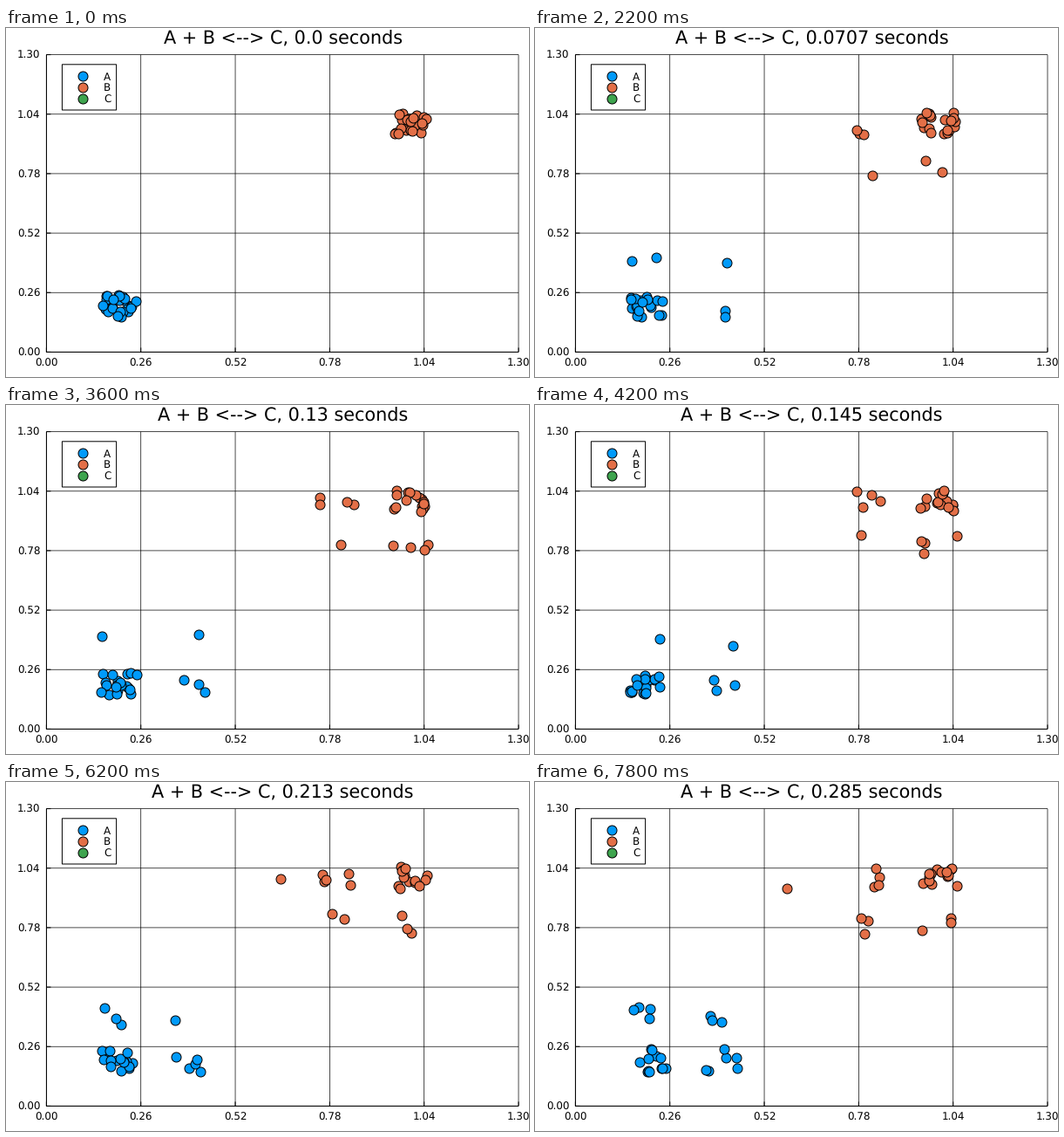
A matplotlib script that plays this animation: 600 px wide and 400 px high, repeating every 8000 ms.

```python
import numpy as np
import matplotlib
import matplotlib.pyplot as plt
from matplotlib.animation import FuncAnimation
from matplotlib.patches import Rectangle

matplotlib.rcParams.update({"toolbar": "None", "text.hinting": "none"})

W, H, DPI = 600, 400, 100
FRAMES, STEP_MS = 40, 200
COUNT = 25
LEFT, RIGHT, TOP, BOTTOM = 46.4, 588.0, 30.6, 371.4
LIMIT, TICK = 1.3, 0.26
CELL = 0.2      # lattice pitch of the diffusion grid
SPREAD = 0.05   # molecules are scattered this far around a cell centre
BLUE, ORANGE, GREEN = "#009afa", "#e36f47", "#3ea44e"

# Simulated time, and molecules that have reached each cell, at a few steps.
STEPS = [0, 7, 14, 18, 25, 31, 39]
SECONDS = [0.0, 0.0456, 0.0895, 0.13, 0.165, 0.213, 0.285]
A_HOME, A_REACHED = (1, 1), {
    (1, 2): [0, 1, 2, 1, 2, 3, 4],
    (2, 1): [0, 2, 2, 3, 4, 5, 6],
    (2, 2): [0, 0, 1, 1, 1, 1, 3],
}
B_HOME, B_REACHED = (5, 5), {
    (4, 5): [0, 1, 4, 4, 5, 5, 4],
    (4, 4): [0, 1, 1, 1, 1, 2, 3],
    (5, 4): [0, 1, 2, 4, 4, 3, 3],
    (3, 5): [0, 0, 0, 0, 0, 1, 1],
}


def to_px(x, y):
    return (LEFT + x * (RIGHT - LEFT) / LIMIT,
            BOTTOM - y * (BOTTOM - TOP) / LIMIT)


def scatter(step, home, reached, seed):
    """Every molecule is placed anew at random within its cell."""
    rng = np.random.default_rng([seed, step])
    cells = []
    for cell, counts in reached.items():
        cells += [cell] * round(np.interp(step, STEPS, counts))
    cells += [home] * (COUNT - len(cells))
    xy = np.array(cells) * CELL + rng.uniform(-SPREAD, SPREAD, (COUNT, 2))
    return to_px(*rng.permutation(xy).T)


def label(x, y, text, size=11.9, **kw):
    return ax.text(x, y, text, fontsize=size * 72 / DPI, family="DejaVu Sans",
                   color="black", va="baseline", zorder=3, **kw)


def rule(xs, ys, width):
    ax.plot(xs, ys, color="black", lw=width * 72 / DPI, snap=False,
            solid_capstyle="butt", zorder=1)


def dots(color, xs=(), ys=()):
    line, = ax.plot(xs, ys, "o", ms=11 * 72 / DPI, mew=72 / DPI, mfc=color,
                    mec="black", snap=False, zorder=3)
    return line


fig = plt.figure(figsize=(W / DPI, H / DPI), dpi=DPI, facecolor="white")
ax = fig.add_axes([0, 0, 1, 1])
ax.set_xlim(0, W)
ax.set_ylim(H, 0)
ax.axis("off")

for k in range(6):
    x, y = to_px(k * TICK, k * TICK)
    text = f"{k * TICK:.2f}"
    rule([x, x], [TOP, BOTTOM], 0.7)
    rule([LEFT, RIGHT], [y, y], 0.7)
    rule([x, x], [BOTTOM - 5, BOTTOM], 1)
    rule([LEFT, LEFT + 5], [y, y], 1)
    label(x, 388, text, ha="center")
    label(39.5, y + 4.6, text, ha="right")
rule([LEFT, LEFT, RIGHT], [TOP, BOTTOM, BOTTOM], 1)

ax.add_patch(Rectangle((64.4, 41.8), 62.2, 52.2, fc="white", ec="black",
                       lw=72 / DPI, snap=False, zorder=2))
for i, (name, color) in enumerate(zip("ABC", (BLUE, ORANGE, GREEN))):
    y = 55.2 + 13 * i
    dots(color, [88.2], [y])
    label(111.9, y + 4.3, name, ha="left")

title = label((LEFT + RIGHT) / 2 + 0.4, 18.6, "", size=20.8, ha="center")
a_dots, b_dots = dots(BLUE), dots(ORANGE)


def draw(step):
    a_dots.set_data(*scatter(step, A_HOME, A_REACHED, 1))
    b_dots.set_data(*scatter(step, B_HOME, B_REACHED, 2))
    seconds = float(f"{np.interp(step, STEPS, SECONDS):.3g}")
    title.set_text(f"A + B <--> C, {seconds} seconds")
    return a_dots, b_dots, title


anim = FuncAnimation(fig, draw, frames=FRAMES, init_func=lambda: draw(0),
                     interval=STEP_MS, repeat=True, repeat_delay=0)
plt.show()
```
